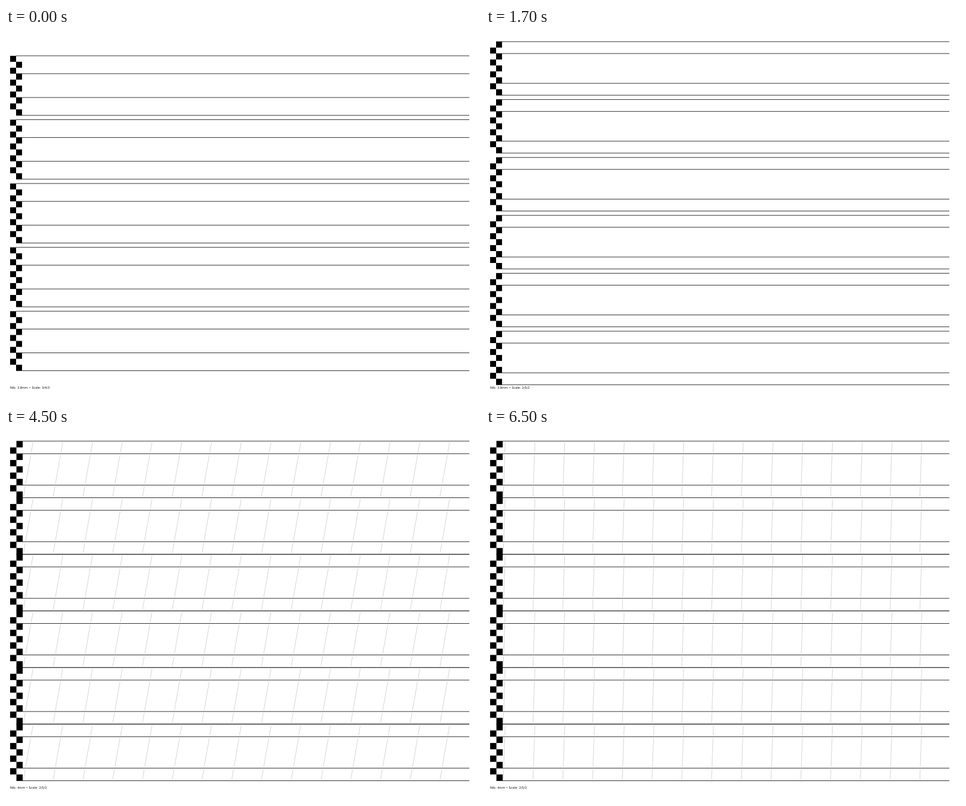
These frames come from a looping animation (800x627 px, 8000 ms). An HTML page:

```html
<!DOCTYPE html>
<html lang="en">
<head>
<meta charset="utf-8">
<title>Calligraphy guide sheets</title>
<style>
  html, body { margin: 0; height: 100%; overflow: hidden; background: #fff; }
  svg { display: block; width: 100vw; height: 100vh; }
  text { font: 5.15px "DejaVu Sans", sans-serif; fill: #111; }
  .slant { stroke: #d6d6d6; stroke-width: 1; }
  .halo { stroke: #fff; stroke-width: 4; }
  .rule { stroke: #333; stroke-width: 1; }
</style>
</head>
<body>
<svg id="stage" viewBox="0 0 800 627"></svg>
<script>
const LEFT = 7, RIGHT = 782, LOOP = 8000;

// unit: nib width in px, step: distance between rows, slant: degrees
const sheets = [
  { until: 500,  nib: '3.8', scale: [3, 4, 3], unit: 10.03, top: 46.9, step: 107.6,  rows: 5 },
  { until: 2500, nib: '3.8', scale: [2, 5, 2], unit: 10.03, top: 23,   step: 97.6,   rows: 6 },
  { until: 4500, nib: '2',   scale: [2, 5, 2], unit: 4.79,  top: 34.8, step: 46.63,  rows: 12 },
  { until: 6500, nib: '4',   scale: [2, 5, 2], unit: 10.6,  top: 22.1, step: 95.4,   rows: 6, slant: 10 },
  { until: LOOP, nib: '4',   scale: [2, 5, 2], unit: 10.6,  top: 22.1, step: 95.4,   rows: 6, slant: 2 },
];

const line = (kind, x1, y1, x2, y2) =>
  `<line class="${kind}" x1="${x1}" y1="${y1}" x2="${x2}" y2="${y2}"/>`;

function drawSheet({ nib, scale, unit, top, step, rows, slant }) {
  const count = scale[0] + scale[1] + scale[2];
  const height = count * unit;
  const levels = [0, scale[0], scale[0] + scale[1], count];
  let slants = '', halos = '', rules = '', checks = '';

  for (let r = 0; r < rows; r++) {
    const y = top + r * step;
    if (slant) {
      const lean = height * Math.tan(slant * Math.PI / 180);
      for (let k = 0; k < 15; k++) {
        const x = 29.1 + k * 50.22;
        slants += line('slant', x, y + height, x + lean, y);
      }
    }
    for (const n of levels) {
      const ly = y + n * unit;
      halos += line('halo', LEFT + unit, ly, RIGHT, ly);
      rules += line('rule', LEFT + unit, ly, RIGHT, ly);
    }
    // the ladder of nib squares always ends in the right column
    for (let i = 0; i < count; i++) {
      const x = LEFT + (count - i) % 2 * unit;
      checks += `<rect x="${x}" y="${y + i * unit}" width="${unit}" height="${unit}"/>`;
    }
  }
  const label = `<text x="7" y="608.4">Nib: ${nib}mm • Scale: ${scale.join('/')}</text>`;
  return slants + halos + rules + checks + label;
}

const stage = document.getElementById('stage');
const start = performance.now();
let shown;

function frame() {
  const t = (performance.now() - start) % LOOP;
  const sheet = sheets.find(s => t < s.until);
  if (sheet !== shown) {
    stage.innerHTML = drawSheet(sheet);
    shown = sheet;
  }
  requestAnimationFrame(frame);
}
frame();
</script>
</body>
</html>
```
